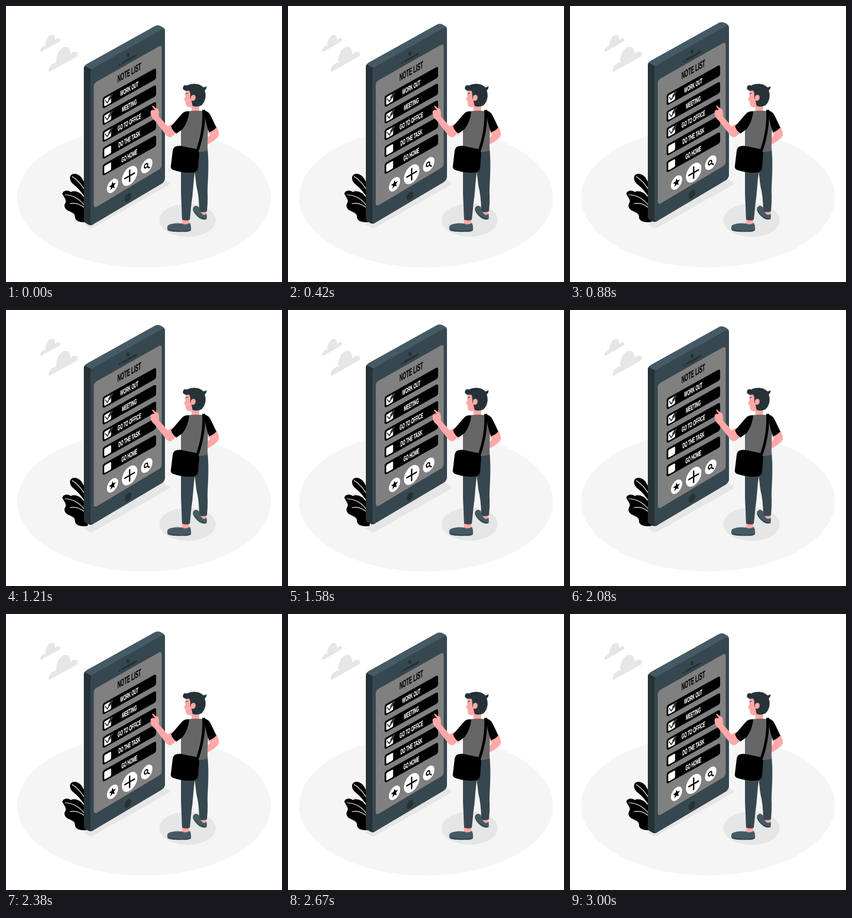
Recreate the animation shown at these times as an HTML page. Size 500x500 px, loop 3.04 s.

```html
<!DOCTYPE html>
<html lang="en">
<head>
<meta charset="utf-8">
<title>Note list</title>
<style>
  html, body { margin: 0; width: 100%; height: 100%; overflow: hidden; background: #fff; }
  svg { display: block; width: 100vw; height: 100vh; }
  text { font: bold 13px "Liberation Sans", Arial, sans-serif; text-anchor: middle; }
  .slate { fill: #37474f; }
  .steel { fill: #455a64; }
  .deep { fill: #263238; }
  .skin { fill: #ffa8a7; }
  .shade { fill: #e6e6e6; }
  .line { fill: none; stroke-linecap: round; stroke-linejoin: round; }
</style>
</head>
<body>
<svg viewBox="0 0 500 500">
  <defs>
    <path id="cloud" fill="#e6e6e6" d="M77 118C77 112 81 106 86 104Q88 102 91 103C89 92 97 77 105 74.500C113 72 118 79 116 88C121 81 131 81 130.500 88Q130 91 126 93L80 118.500Q77 120 77 118Z"/>
  </defs>

  <ellipse cx="250" cy="347" rx="230" ry="127" fill="#f5f5f5"/>
  <use href="#cloud"/>
  <use href="#cloud" transform="translate(9.600 2.100) scale(.68)"/>
  <path class="shade" d="M142 396L150 402Q154 404 159 401L295 324Q299 321 295 319L286 314V295L150 374Z"/>
  <ellipse class="shade" cx="329" cy="388" rx="51" ry="30"/>

  <g id="plant">
    <path d="M116 312C116 304 124 302 131 306C137 309 139 315 142 320L146 350C139 341 135 335 130 330C124 324 116 320 116 312Z"/>
    <path d="M102 340C104 334 112 333 117 337C123 333 134 337 138 343L148 352V391C138 393 126 391 125 383C126 376 119 374 113 371C106 368 104 361 108 356C110 352 105 346 102 340Z"/>
    <path class="line" stroke="#fff" stroke-width="1.200" d="M120 309Q133 317 143 334M107 342Q130 343 144 364M116 358Q131 355 144 367"/>
  </g>

  <g id="phone">
    <path class="steel" d="M141 114Q141 108.500 146 105.500L270 36.500Q276 34 281 37L285 39.500Q288 41 288 46V311Q288 318 282 322L159 395Q153 399 148 395.500L144 393Q141 391 141 387Z"/>
    <path class="deep" d="M141 114Q141 111 142.500 109L156 116L158 396Q153 399 148 395.500L144 393Q141 391 141 387Z"/>
    <path class="slate" d="M153 122Q153 116 158 113L280 44Q288 40 288 47V311Q288 318 282 322L159 395Q153 398 153 391Z"/>
    <path fill="#808080" d="M159 146Q159 140.500 164 137.500L277 73.500Q282 71 282 77V288Q282 293 278 296L165 363.500Q159 366.500 159 360Z"/>
    <g class="deep">
      <ellipse cx="221" cy="89" rx="3" ry="3.800"/>
      <ellipse cx="206" cy="106.500" rx="1.700" ry="2"/>
      <path class="line" stroke="#263238" stroke-width="3.500" d="M211 103.500L236 89.500"/>
      <circle r="7.200" transform="matrix(.866 -.5 0 1 221 347)"/>
    </g>
    <g id="list"></g>
    <g id="buttons"></g>
  </g>

  <g id="man">
    <path class="skin" d="M364 222L382 219C384 226 388 231 384 237C379 243 372 248 363 251L361 243Q366 239 369 234Z"/>
    <path class="skin" d="M319 383H332V398H319ZM351 368H363V382H351Z"/>
    <path class="slate" d="M317 256H365C368 285 366 310 365 335Q366 352 364 372Q357 375 350 372Q350 345 345 326L342 301C339 320 339 340 336 357L333 387Q327 390 319 387L317 340Z"/>
    <path class="line" stroke="#263238" d="M342 302Q347 290 348 274"/>
    <path class="steel" d="M319 394Q325 398 333 393Q336 397 335 406Q332 410 320 409Q303 410 294 407Q290 402 294 397Q303 392 319 394Z"/>
    <path class="steel" d="M340 364Q344 360 349 364Q351 373 356 377.500Q361 380 363 376Q365 382 363 386Q357 389 350 384Q341 377 339 370Q338 366 340 364Z"/>
    <path class="line" stroke="#263238" d="M293 405Q315 411 335 406M339 370Q348 386 363 386"/>

    <path class="skin" d="M325 153Q336 145 350 156V190Q343 195 336 190V183C332 184 327 183 326 179L325 172L322.500 170L325 163Z"/>
    <path class="deep" d="M321 151C319 146 323 142 328 144C337 139 351 140 357 147Q360 148 363 145Q364 150 360 153C364 164 360 175 354 180Q346 184 338 181L336 172Q333 166 334 161Q334 155 331 153Q325 155 321 151Z"/>
    <path class="skin" d="M335 164C338 159 344 161 343.500 166C343 171 339 173 335 171Z"/>
    <path class="line" stroke="#263238" stroke-width="1.200" d="M326 159L329 158"/>

    <path fill="#666" d="M328 191Q344 188 361 191L366 216L365 262Q341 269 317 260V215Z"/>
    <path class="skin" d="M264 181Q267 180 270 184L276 187Q278 193 277 200L293 218L302 213L312 227L300 237Q295 239 291 235L269 207Q262 202 262 194Q261 189 266 188L270 189Z"/>
    <path d="M332 191Q324 190 319 195L299 218Q302 227 309 231L320 223Q330 210 332 191ZM359 189Q367 191 371 199L381 220Q376 226 368 229Q361 213 359 189Z"/>
    <path class="line" stroke="#000" stroke-width="5" style="stroke-linecap:butt" d="M358 188Q360 225 346 264"/>
    <path d="M306 255Q312 252 320 254L344 259Q350 261 350 268L348 294Q346 302 335 302Q316 302 303 297Q297 295 299 287L302 262Q303 257 306 255Z"/>
  </g>
</svg>
<script>
  const NS = 'http://www.w3.org/2000/svg';
  const byId = id => document.getElementById(id);

  function add(parent, tag, attrs, content = '') {
    const node = document.createElementNS(NS, tag);
    for (const key in attrs) node.setAttribute(key, attrs[key]);
    node.textContent = content;
    return parent.appendChild(node);
  }

  // Places artwork on the slanted face of the phone.
  const face = (x, y, sx = 1, slope = .56) =>
    `matrix(${sx} ${-sx * slope} 0 1 ${x} ${y})`;

  function label(x, y, words, size, color) {
    add(byId('list'), 'text', {
      transform: face(x, y, .455), y: size * .36, fill: color,
      stroke: color, 'stroke-width': .3, style: `font-size:${size}px`
    }, words);
  }

  label(223.3, 120.5, 'NOTE LIST', 18, '#000');
  ['WORK OUT', 'MEETING', 'GO TO OFFICE', 'DO THE TASK', 'GO HOME'].forEach((words, i) => {
    const y = 149.5 + i * 30.4;
    const list = byId('list');
    add(list, 'rect', { x: -48.5, y: -10.3, width: 97, height: 20.6, rx: 4, transform: face(223.5, y) });
    add(list, 'rect', { x: -6.2, y: -7, width: 12.4, height: 14, rx: 2, fill: '#fff', transform: face(184.2, y + 22.5) });
    if (i < 3) {
      const tick = { class: 'line', d: 'M-4 0L-.5 4.500L8.500 -11', transform: `translate(184 ${y + 22})` };
      add(list, 'path', { ...tick, stroke: '#000', 'stroke-width': 3.4, d: 'M3 -2L8.500 -11' });
      add(list, 'path', { ...tick, stroke: '#37474f', 'stroke-width': 2 });
    }
    label(223.5, y + .5, words, 13, '#fff');
  });

  function button(x, y, r, icon) {
    const group = add(byId('buttons'), 'g', { transform: face(x, y, .866, .577) });
    add(group, 'circle', { r, fill: '#fff' });
    add(group, 'path', icon);
  }

  const star = Array.from({ length: 10 }, (_, i) => {
    const r = i % 2 ? 3.4 : 7.6;
    const a = i * Math.PI / 5;
    return [r * Math.sin(a), -r * Math.cos(a)].map(v => v.toFixed(2));
  });
  const stroke = (d, width) => ({ class: 'line', stroke: '#000', 'stroke-width': width, d });

  button(193, 326, 11.8, { d: `M${star.join('L')}Z` });
  button(224, 308, 16.2, stroke('M-10 0H10M0 -10V10', 2.8));
  button(255, 290, 12, stroke('M2 -1A3.500 3.500 0 1 1 -5 -1A3.500 3.500 0 1 1 2 -1M1.500 2L5.500 6', 2.2));

  // A steady three-second bob, then a short hold before the loop restarts.
  const loop = 3040;
  const steps = [[0, -.27], [1460, -10], [2960, 0], [3000, -.27], [loop, -.27]];
  byId('phone').animate(
    steps.map(([t, y]) => ({ offset: t / loop, transform: `translateY(${y}px)` })),
    { duration: loop, iterations: Infinity }
  );
</script>
</body>
</html>
```
